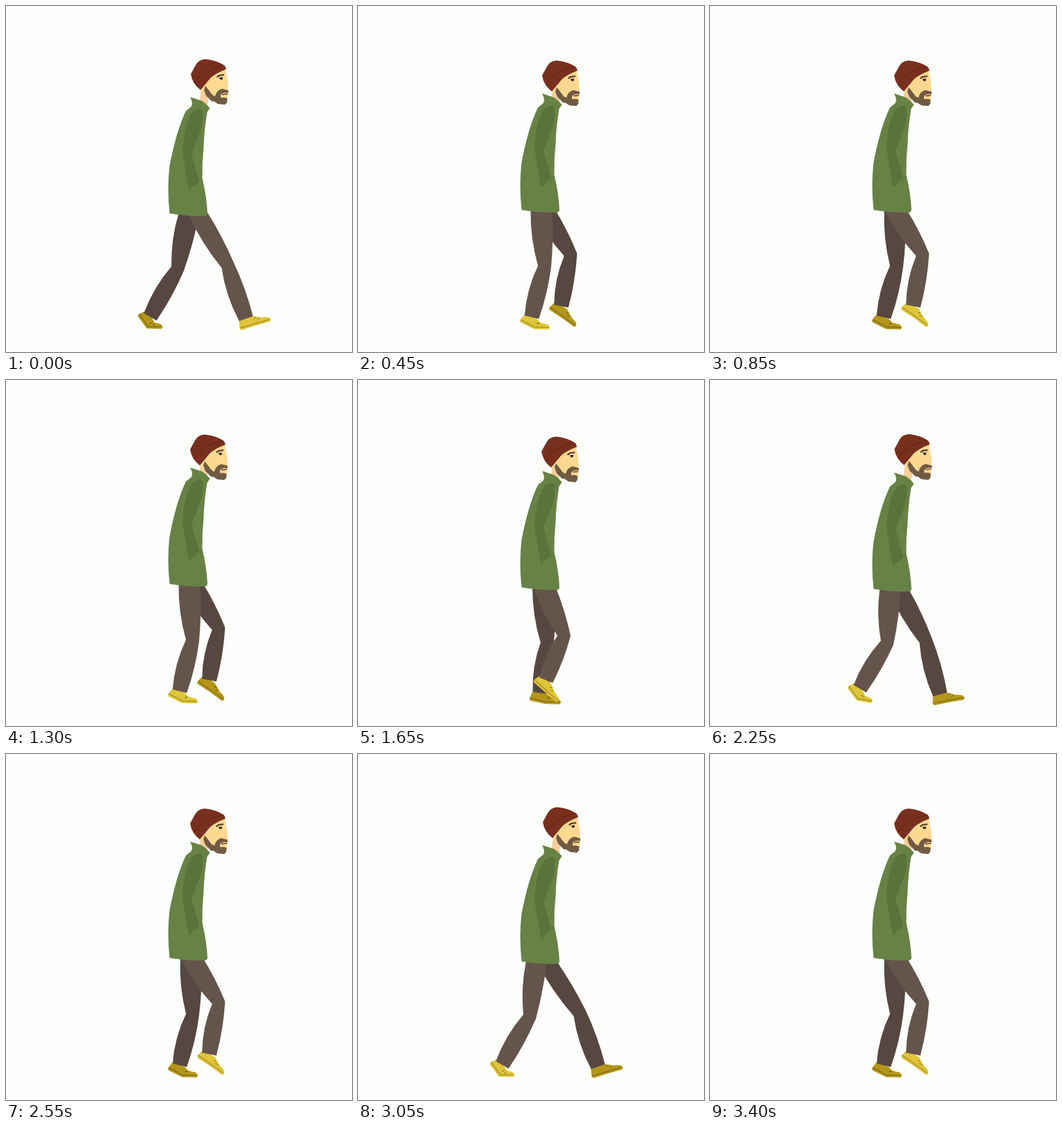
Recreate the animation shown at these times as an HTML page. Size 498 px wide and 498 px high, loop 3450 ms.

```html
<!DOCTYPE html>
<html lang="en">
<head>
<meta charset="utf-8">
<title>Walking man</title>
<style>
html, body { margin: 0; width: 100%; height: 100%; overflow: hidden; background: #fdfffc; }
svg { display: block; width: 100vw; height: 100vh; }
</style>
</head>
<body>
<svg viewBox="0 0 498 498">
  <g id="far">
    <path class="shoe" fill="#b4961a"/>
    <path class="sole" fill="none" stroke="#7f6912" stroke-width="1.2"/>
    <path class="lace" fill="none" stroke="#6e5a10" stroke-width="1"/>
    <path class="pants" fill="#574740"/>
  </g>
  <g id="near">
    <path class="shoe" fill="#dfc53a"/>
    <path class="sole" fill="none" stroke="#a38c1f" stroke-width="1.2"/>
    <path class="lace" fill="none" stroke="#8a7519" stroke-width="1"/>
    <path class="pants" fill="#65544b"/>
  </g>
  <path id="neck" fill="#f8cf9a" d="M281 116L278 146L289 150L292 130Z"/>
  <g id="coat">
    <path fill="#668245" d="M265 131L282 136.500Q289 141 293.500 147L289.500 153Q285 180 284.500 203Q282 225 282.500 248Q289 275 290 299L288 302Q260 303 235.500 298.500Q231.500 262 235.500 230Q245 180 259 151L266.500 145Q270 140 265 131Z"/>
    <path fill="#59743b" d="M268 153Q276 146 283 150Q284 165 281 177L267 213L278 252L263 265L254 212Q255 190 259 174Q262 162 268 153Z"/>
    <path fill="none" stroke="#59743b" d="M263 265L283 249"/>
  </g>
  <g id="head">
    <path fill="#fcd890" d="M281 120L290 104L315 89L317 97Q320 110 320 122L318.500 135L300 137L288 126Z"/>
    <path fill="#705b42" d="M287 115L291 120L297 128L301 130Q303 121 311 119L320 121.500L320 125Q312 124 309 128L309 132Q314 131 318.500 133L318 139L315 142L305 141L300 137.500L296 137L288 129L285 121Z"/>
    <path fill="none" stroke="#5a4430" stroke-width="1.3" d="M311 127.500L319 126.500"/>
    <path fill="none" stroke="#4a3527" stroke-width="2" d="M303.500 102.500L307 100L314 99"/>
    <path fill="#3a2a20" d="M306.500 103L312 102.500L311.500 106L308.500 106Z"/>
    <path fill="#782f1e" d="M266 98L273 85Q277 77 287 76.500Q304 78 315 86L317 91Q301 97 294 104L280 121Q268 112 266 98Z"/>
    <path fill="none" stroke="#642316" stroke-width="1" d="M272 110Q282 93 313 85"/>
  </g>
</svg>
<script>
const STEP = 50, LOOP = 3450, CYCLE = 17;

// One leg: hip x, hip half width, knee, ankle, heel angle, toe angle
const POSES = [
  [276, 14.5, 319, 373, 345.5, 450, -17, -17], // heel strike
  [268.5, 17, 276, 382, 274, 453, 0, 0],       // weight over foot
  [264, 15.5, 268.5, 375, 250, 448, 28, 0],    // heel rising
  [257, 15, 247, 378, 207.5, 447.5, 55, 0],    // push off
  [270, 16, 287, 378, 248.5, 432, 50, 46],     // swing past
  [267, 16, 306, 358, 292.5, 432, 35, 35]      // swing forward
];
// Coat dy, head dx, head dy, head tilt
const BODY = [
  [0, 0, 0, 0],
  [5, -3, 8, 1],
  [-5, -1, 2, 0]
];
const KEYS = [1, 6, 9, 10, 15, 17, 18];
const HIP = 268;

const $ = id => document.getElementById(id);
const mix = (a, b, f) => a.map((v, i) => v + (b[i] - v) * f);
const bump = f => 4 * f * (1 - f);

function sample(list, p) {
  const i = Math.floor(p), n = list.length;
  return mix(list[i % n], list[(i + 1) % n], p - i);
}

const pt = p => p[0].toFixed(2) + ' ' + p[1].toFixed(2);
const poly = pts => 'M' + pts.map(pt).join('L');

// Curve from a to b, swelling to the right of its direction by w
function bow(a, b, w) {
  const dx = b[0] - a[0], dy = b[1] - a[1], l = Math.hypot(dx, dy);
  const c = [(a[0] + b[0]) / 2 - dy / l * 2 * w, (a[1] + b[1]) / 2 + dx / l * 2 * w];
  return 'Q' + pt(c) + ' ' + pt(b);
}

// Places local points in a frame turned by deg
function turn(ox, oy, deg) {
  const r = deg * Math.PI / 180, c = Math.cos(r), s = Math.sin(r);
  return (x, y) => [ox + x * c - y * s, oy + x * s + y * c];
}

function across(x, y, dx, dy, w) {
  const l = Math.hypot(dx, dy);
  return [[x - dy / l * w, y + dx / l * w], [x + dy / l * w, y - dx / l * w]];
}

function drawLeg(id, p, dy, sway) {
  let [hx, hw, kx, ky, ax, ay, heel, toe] = sample(POSES, p);
  hx = HIP + (hx - HIP) * sway;
  if (p < 1) {
    heel = toe = POSES[0][6] * (1 - p) ** 2;
    ay += 3 * bump(p);
  }
  const hy = 298 + dy;
  const l1 = Math.hypot(kx - hx, ky - hy), l2 = Math.hypot(ax - kx, ay - ky);
  const [kb, kf] = across(kx, ky, (kx - hx) / l1 + (ax - kx) / l2, (ky - hy) / l1 + (ay - ky) / l2, 9.5);
  const [ab, af] = across(ax, ay, ax - kx, ay - ky, 10.5);
  const hb = [hx - hw, hy], hf = [hx + hw, hy];
  const set = (cls, d) => $(id).querySelector('.' + cls).setAttribute('d', d);
  set('pants', 'M' + pt(hb) + bow(hb, kb, 3) + bow(kb, ab, 3.5) +
    'L' + pt(af) + bow(af, kf, 2) + bow(kf, hf, 1.5) + 'Z');

  const rear = turn(ax, ay, heel);
  const ball = rear(11, 13.5);
  const front = turn(ball[0], ball[1], toe);
  set('shoe', poly([rear(-10.5, -1), rear(-13, 11.5), rear(-11, 14), ball,
    front(21, 0.5), front(23, -2.5), front(20, -6.5), front(10, -9), rear(14, 1), rear(9, -1)]) + 'Z');
  set('sole', poly([rear(-11.5, 10.5), rear(10, 10.5), front(21, -2.5)]));
  set('lace', poly([rear(11, 4), rear(14, 2)]) + poly([front(4, -7), front(8, -9)]));
}

function draw(ms) {
  const n = Math.floor((ms % LOOP) / STEP);
  const phase = n ? (n - 1) % CYCLE + 1 : 1;
  const k = KEYS.findIndex((v, i) => phase >= v && phase < KEYS[i + 1]);
  const p = k + (phase - KEYS[k]) / (KEYS[k + 1] - KEYS[k]);

  let [dy, hx, hy, tilt] = sample(BODY, p % 3);
  if (p % 3 < 1) dy += 2 * bump(p % 3);
  drawLeg('far', (p + 3) % 6, dy, 0.4);
  drawLeg('near', p, dy, 1);
  $('coat').setAttribute('transform', `translate(0 ${dy})`);
  $('neck').setAttribute('transform', `translate(${hx / 2} ${(hy + dy) / 2})`);
  $('head').setAttribute('transform', `translate(${hx} ${hy}) rotate(${tilt} 292 110)`);
}

const start = performance.now();
function tick() {
  draw(performance.now() - start);
  requestAnimationFrame(tick);
}
draw(0);
requestAnimationFrame(tick);
</script>
</body>
</html>
```
